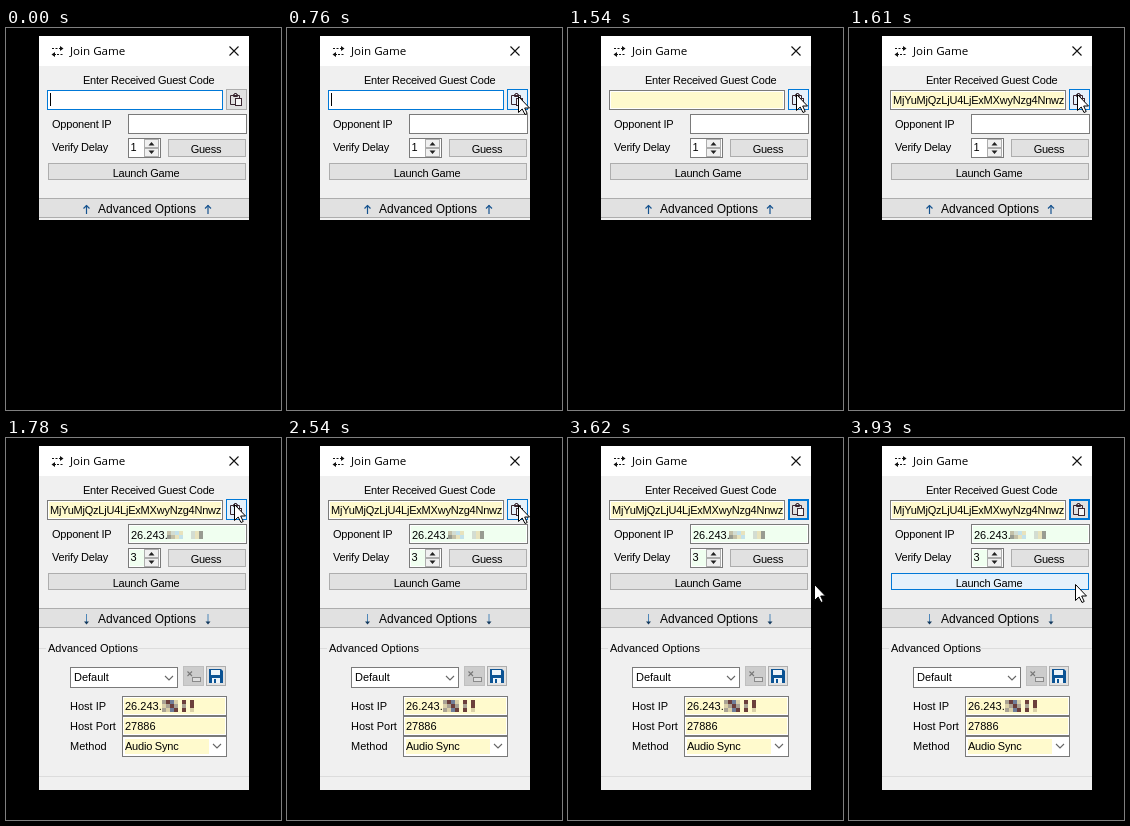
Write an HTML page that moves like this. It is 275 by 382 pixels and loops after 5640 ms.

```html
<!DOCTYPE html>
<html lang="en">
<head>
<meta charset="utf-8">
<title>Join Game</title>
<style>
  html, body { margin: 0; width: 100%; height: 100%; overflow: hidden; background: #000; }
  svg { display: block; width: 100vw; height: 100vh; }
  text { font: 11px "Liberation Sans", Arial, sans-serif; fill: #000; white-space: pre; }
  .tight { letter-spacing: -0.22px; }
  .title { font: 11.6px "Open Sans", "Noto Sans", sans-serif; }
  .strip { font-size: 12px; }
  rect { shape-rendering: crispEdges; }
</style>
</head>
<body>
<svg id="stage" viewBox="0 0 275 382" preserveAspectRatio="none"></svg>
<script>
const LOOP = 5640;
const BLUE = '#0078d7', GRAY = '#7a7a7a', EDGE = '#adadad';
const FACE = '#e1e1e1', HOT = '#e5f1fb', LEMON = '#fffacd', MINT = '#f0fff0';

// Pointer stops: time, x, y; a bare time hides the pointer.
const STOPS = [
  [0], [450, 270, 66], [520, 258, 67], [600, 246, 68], [680, 237, 68],
  [760, 231, 68], [830, 229, 67], [910, 228, 66],
  [2540, 231, 67], [2610, 239, 69], [2690, 250, 72], [2770, 262, 75],
  [2850, 270, 80], [2950],
  [3390, 270, 140], [3460, 261, 143], [3540, 253, 145], [3620, 246, 146],
  [3700, 242, 146], [3780, 236, 146], [3850, 230, 146], [3930, 226, 146]
];

const fill = (x, y, w, h, c) => `<rect x="${x}" y="${y}" width="${w}" height="${h}" fill="${c}"/>`;
const box = (x, y, w, h, c, edge, t = 1) =>
  fill(x, y, w, h, edge) + fill(x + t, y + t, w - 2 * t, h - 2 * t, c);
// Input with a white rim between its border and its tint.
const field = (x, y, w, h, c, edge = GRAY) =>
  box(x, y, w, h, '#fff', edge) + fill(x + 2, y + 2, w - 4, h - 4, c);
const text = (x, y, s, cls = '', anchor = 'start') =>
  `<text x="${x}" y="${y}" class="${cls}" text-anchor="${anchor}">${s}</text>`;
const line = (d, c = '#222', w = 1) =>
  `<path d="${d}" fill="none" stroke="${c}" stroke-width="${w}"/>`;
const shape = (d, c) => `<path d="${d}" fill="${c}"/>`;
const chevron = (x, y) => line(`M${x - 4} ${y - 2}l4 4l4-4`, '#666', 1.1);

function mosaic(x, y, rows, colors) {
  return rows.map((row, j) => [...row].map((k, i) =>
    colors[k] ? fill(x + i * 4, y + j * 4, 4, 4, colors[k]) : '').join('')).join('');
}

function titleBar() {
  return fill(33, 8, 210, 30, '#fff') +
    line('M46 20.5h2m1.5 0h2m1.5 0h2M51 26.5h2m1.5 0h2M48 26.5h2', '#111') +
    shape('M54 18l3.5 2.5l-3.5 2.5zM49 24l-3.5 2.5l3.5 2.5z', '#111') +
    text(64, 27, 'Join Game', 'title') +
    line('M223.5 18.5l9 9m0-9l-9 9', '#111', 1.1);
}

function pasteButton(mode) {
  const looks = {
    idle: [FACE, EDGE, 1], hot: [HOT, BLUE, 1],
    down: ['#cce4f7', '#005499', 1], focus: [FACE, BLUE, 2]
  };
  const ink = '#3a2630';
  return box(220, 61, 21, 21, ...looks[mode]) +
    line('M229 76.5h-4.5v-9h9v3', ink) +
    line('M227.5 68.500v-2h1v-1h2v1h1v2z', ink) +
    box(229, 70, 7, 8, '#f6f6f6', ink);
}

function spinner(value, color) {
  return field(122, 110, 33, 20, color) + text(124.5, 123, value) +
    box(138, 111, 15, 9, '#f0f0f0', EDGE) + box(138, 120, 15, 9, '#f0f0f0', EDGE) +
    shape('M142.500 117.500l3-3.500l3 3.500zM142.500 122.500l3 3.500l3-3.500z', '#222');
}

function stripArrow(x, down) {
  if (down) {
    return line(`M${x} 176v9`, '#4d86b8') + shape(`M${x - 2.5} 183.500h5l-2.500 3z`, '#12385c');
  }
  return line(`M${x} 177v9`, '#16538f', 1.2) +
    line(`M${x - 3} 180.500l3-3l3 3`, '#16538f', 1.2);
}

function presetButtons() {
  return box(177, 228, 21, 20, '#ccc', '#bfbfbf') +
    line('M181.500 233.500l4.500 4.500m0-4.500l-4.500 4.500', '#777', 1.1) +
    box(186, 239, 9, 5, '#ddd', '#8a8a8a') +
    box(200, 228, 20, 20, FACE, EDGE) +
    shape('M203 231h12l2 2v12h-14z', '#0b5394') +
    fill(205, 232, 9, 5, '#eef4f9') +
    fill(206, 240, 8, 5, '#eef4f9') + fill(208, 241, 2, 4, '#0b5394');
}

function advanced() {
  return line('M33 210.5h7M132 210.5h111M33 338.5h210', '#dcdcdc') +
    text(42, 214, 'Advanced Options') +
    box(64, 229, 108, 21, '#fff', GRAY) + text(68, 243, 'Default') + chevron(163, 240) +
    presetButtons() +
    text(64, 272, 'Host IP') + field(116, 258, 105, 20, LEMON) + text(119, 272, '26.243.') +
    mosaic(156, 262, ['gmbs.m.m', 'sgmg.g.m', 'gsbm.m.s'],
      { m: '#6b3f3c', g: '#a9a294', b: '#6f7d98', s: '#d9cfa8' }) +
    text(64, 292, 'Host Port') + field(116, 278, 105, 20, LEMON) + text(119, 292, '27886') +
    text(64, 312, 'Method') + box(116, 298, 105, 21, '#fff', GRAY) +
    fill(119, 301, 84, 15, LEMON) + text(119, 312, 'Audio Sync', 'tight') + chevron(211, 308);
}

function pointer(x, y) {
  return `<path transform="translate(${x} ${y})" d="M.5 .5V16.5L4.2 13L7 18.5L9.2 17.5L6.7 12H11.5Z" fill="#fff" stroke="#000"/>`;
}

function stateAt(t) {
  const [, x, y] = STOPS.filter(s => s[0] <= t).pop();
  const onPaste = x < 241 && y < 82;
  let paste = t >= 1450 ? 'focus' : 'idle';
  if (onPaste) paste = t >= 1450 && t < 1540 ? 'down' : 'hot';
  return {
    x, y, paste,
    caret: t < 130 || (t >= 680 && t < 1140),
    editing: t < 1450,
    lemon: t >= 1540,
    code: t >= 1610,
    open: t >= 1690,
    done: t >= 1780,
    launch: x < 240 && y >= 135
  };
}

function scene(s) {
  const tint = s.open ? MINT : '#fff';
  const bottom = s.open ? 352 : 192;
  return fill(0, 0, 275, 382, '#000') +
    fill(33, 8, 210, bottom - 8, '#f0f0f0') + titleBar() +
    text(77, 56, 'Enter Received Guest Code', 'tight') +
    field(41, 62, 176, 20, s.lemon ? LEMON : '#fff', s.editing ? BLUE : GRAY) +
    (s.code ? text(44, 76, 'MjYuMjQzLjU4LjExMXwyNzg4Nnwz', 'tight') : '') +
    (s.caret ? fill(44, 65, 1, 13, '#000') : '') +
    pasteButton(s.paste) +
    text(46, 100, 'Opponent IP', 'tight') + field(122, 86, 119, 20, tint) +
    (s.open ? text(125, 101, '26.243.') +
      mosaic(161, 93, ['bdlc..dcg', 'gbcl..dcg'],
        { g: '#989b91', b: '#c3c0a8', c: '#e8e3bd', d: '#d3ddd2', l: '#c4e2ea' }) : '') +
    text(46, 123, 'Verify Delay', 'tight') + spinner(s.open ? 3 : 1, tint) +
    box(162, 111, 78, 18, FACE, EDGE) + text(200, 125, 'Guess', 'tight', 'middle') +
    box(42, 135, 198, 17, s.launch ? HOT : FACE, s.launch ? BLUE : EDGE) +
    text(140, 149, 'Launch Game', 'tight', 'middle') +
    fill(33, 170, 210, 20, EDGE) + fill(33, 171, 210, 18, FACE) +
    text(141, 185, 'Advanced Options', 'strip', 'middle') +
    stripArrow(80.5, s.open) + stripArrow(202, s.open) +
    (s.done ? advanced() : '') +
    (s.x ? pointer(s.x, s.y) : '');
}

const stage = document.getElementById('stage');
const start = performance.now();
let shown = '';

function draw() {
  const state = stateAt((performance.now() - start) % LOOP);
  const key = JSON.stringify(state);
  if (key !== shown) {
    stage.innerHTML = scene(state);
    shown = key;
  }
  requestAnimationFrame(draw);
}
draw();
</script>
</body>
</html>
```
